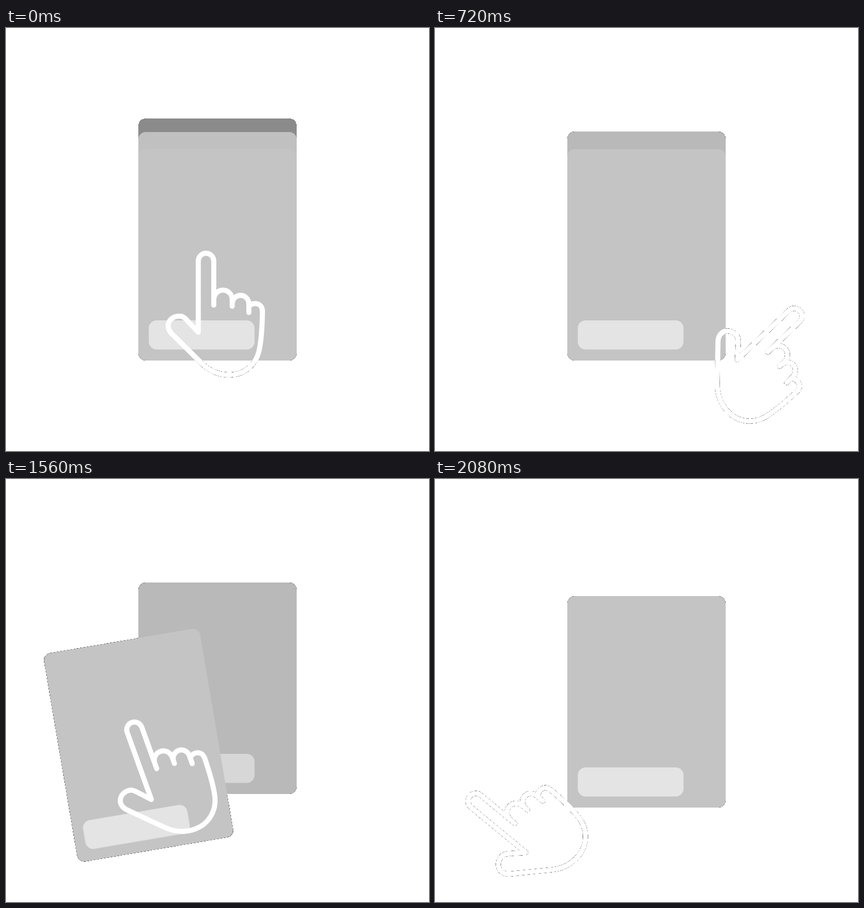
Animation of 748x748 px, one loop 3040 ms. Source, as an HTML page with a canvas:

```html
<!DOCTYPE html>
<html>
<head>
<meta charset="utf-8">
<style>
html, body { margin: 0; width: 100%; height: 100%; overflow: hidden; background: #fff; }
canvas { display: block; }
</style>
</head>
<body>
<canvas id="stage" width="748" height="748"></canvas>
<script>
const SIZE = 748, LOOP = 3040, STEP = 40, SECOND_SWIPE = 1360;
const CARD_W = 280, CARD_H = 374, PAD = 2;
const CENTER_X = 374, CUTOFF = 100, HAND_TURN = 50.4;
const ctx = document.getElementById('stage').getContext('2d', { willReadFrequently: true });
const clamp = v => Math.min(1, Math.max(0, v));
const progress = (t, from, to) => clamp((t - from) / (to - from));
const mix = (a, b, p) => a + (b - a) * p;
const rad = degrees => degrees * Math.PI / 180;

const handPath = new Path2D(`
  M340 538 V412 a13.7 13.7 0 0 1 27.4 0 V490
  M367.5 480 a16.2 16.5 0 0 1 32.5 0 V492
  M400 487 a14.8 15.5 0 0 1 29.5 0 V503
  M429.5 494 C431 485 453.5 483 453.5 501
  C453 530 452 553 447 573 C441 596 421 613.5 395 613.5
  C372 613.5 357 604 345 592 L292.5 540
  C278 524 293 506 311 510 C317 512 320 517 324 521 L340 538`);
const happyPath = new Path2D(`
  M12 17.5c2.33 0 4.31-1.46 5.11-3.5H6.89c.8 2.04 2.78 3.5 5.11 3.5z
  M8.88 9.94l1.06 1.06L11 9.94 8.88 7.82 6.76 9.94 7.82 11z
  M15.12 9.94l1.06 1.06 1.06-1.06-2.12-2.12L13 9.94 14.06 11z`);
const sadEyes = new Path2D('M7 9.5a1.5 1.5 0 1 0 3 0a1.5 1.5 0 1 0-3 0M14 9.5a1.5 1.5 0 1 0 3 0a1.5 1.5 0 1 0-3 0');
const sadMouth = new Path2D('M9.4 16.6Q12 14.6 14.6 16.6');

function box(c, x, y, w, h, r, color) {
  c.fillStyle = color;
  c.beginPath();
  c.roundRect(x, y, w, h, r);
  c.fill();
}

const cardSprite = document.createElement('canvas');
cardSprite.width = CARD_W + 2 * PAD;
cardSprite.height = CARD_H + 2 * PAD;
const cardCtx = cardSprite.getContext('2d');
box(cardCtx, PAD, PAD, CARD_W, CARD_H, 13, '#c4c4c4');
box(cardCtx, PAD + 18.5, PAD + 303, 187, 51.5, 14, '#e4e4e4');

function drawCard(top, alpha, shift = 0, angle = 0) {
  ctx.save();
  ctx.globalAlpha = alpha;
  ctx.translate(CENTER_X + shift, top + CARD_H / 2 + Math.abs(shift) / 2);
  ctx.rotate(rad(angle));
  ctx.drawImage(cardSprite, -CARD_W / 2 - PAD, -CARD_H / 2 - PAD);
  ctx.restore();
}

function drawFace(happy, alpha) {
  ctx.save();
  ctx.globalAlpha = alpha;
  box(ctx, 313, 340.5, 122, 121.5, 14, 'rgba(255,255,255,.62)');
  ctx.translate(374, 401);
  ctx.scale(3.65, 3.65);
  ctx.translate(-12, -12);
  ctx.fillStyle = ctx.strokeStyle = 'rgba(0,0,0,.68)';
  ctx.lineWidth = 2;
  ctx.beginPath();
  ctx.arc(12, 12, 9, 0, 7);
  ctx.stroke();
  ctx.fill(happy ? happyPath : sadEyes);
  if (!happy) {
    ctx.lineWidth = 1.5;
    ctx.stroke(sadMouth);
  }
  ctx.restore();
}

function drawHand(angle) {
  ctx.save();
  ctx.translate(380.5, 790);
  ctx.rotate(rad(angle));
  ctx.translate(-380.5, -790);
  ctx.strokeStyle = '#fff';
  ctx.lineWidth = 9;
  ctx.lineCap = ctx.lineJoin = 'round';
  ctx.stroke(handPath);
  ctx.restore();
}

// One-bit transparency: faint pixels vanish, the others are matted on black.
function flatten() {
  const image = ctx.getImageData(0, 0, SIZE, SIZE), px = image.data;
  for (let i = 0; i < px.length; i += 4) {
    const a = px[i + 3];
    if (a === 255) continue;
    const matte = a < CUTOFF ? 0 : a / 255;
    for (let k = i; k < i + 3; k++) px[k] = matte ? px[k] * matte : 255;
    px[i + 3] = 255;
  }
  ctx.putImageData(image, 0, 0);
}

function draw(now) {
  // The motion runs in even steps; the small lead absorbs display jitter.
  const time = Math.floor((now + 8) / STEP) * STEP % LOOP;
  const first = time < SECOND_SWIPE;
  const t = first ? time : time - SECOND_SWIPE;
  const side = first ? 1 : -1;
  const settle = progress(t, 490, 690);
  const brighten = Math.sqrt(settle);

  ctx.clearRect(0, 0, SIZE, SIZE);
  if (first) {
    drawCard(mix(160, 183, settle), mix(.71, .945, brighten));
    drawCard(mix(184, 214, settle), mix(.945, 1, brighten));
  } else {
    drawCard(mix(183, 207, settle), mix(.945, 1, brighten));
  }

  if (settle < 1) {
    const shift = t * (.844 - t * (.000796 - t * 3.25e-7));
    const angle = shift / 14 * (1 - .4 * Math.exp(-t / 80));
    drawCard(214, 1 - settle ** 2.7, side * shift, side * angle);
  }
  const faceAlpha = Math.min(progress(t, 250, 500), 1 - settle);
  if (faceAlpha > 0) drawFace(first, faceAlpha);

  const back = first ? progress(t, 680, 1171) : 0;
  drawHand(side * HAND_TURN * (progress(t, 7, 498) - back));
  flatten();
  requestAnimationFrame(draw);
}
requestAnimationFrame(draw);
</script>
</body>
</html>
```
